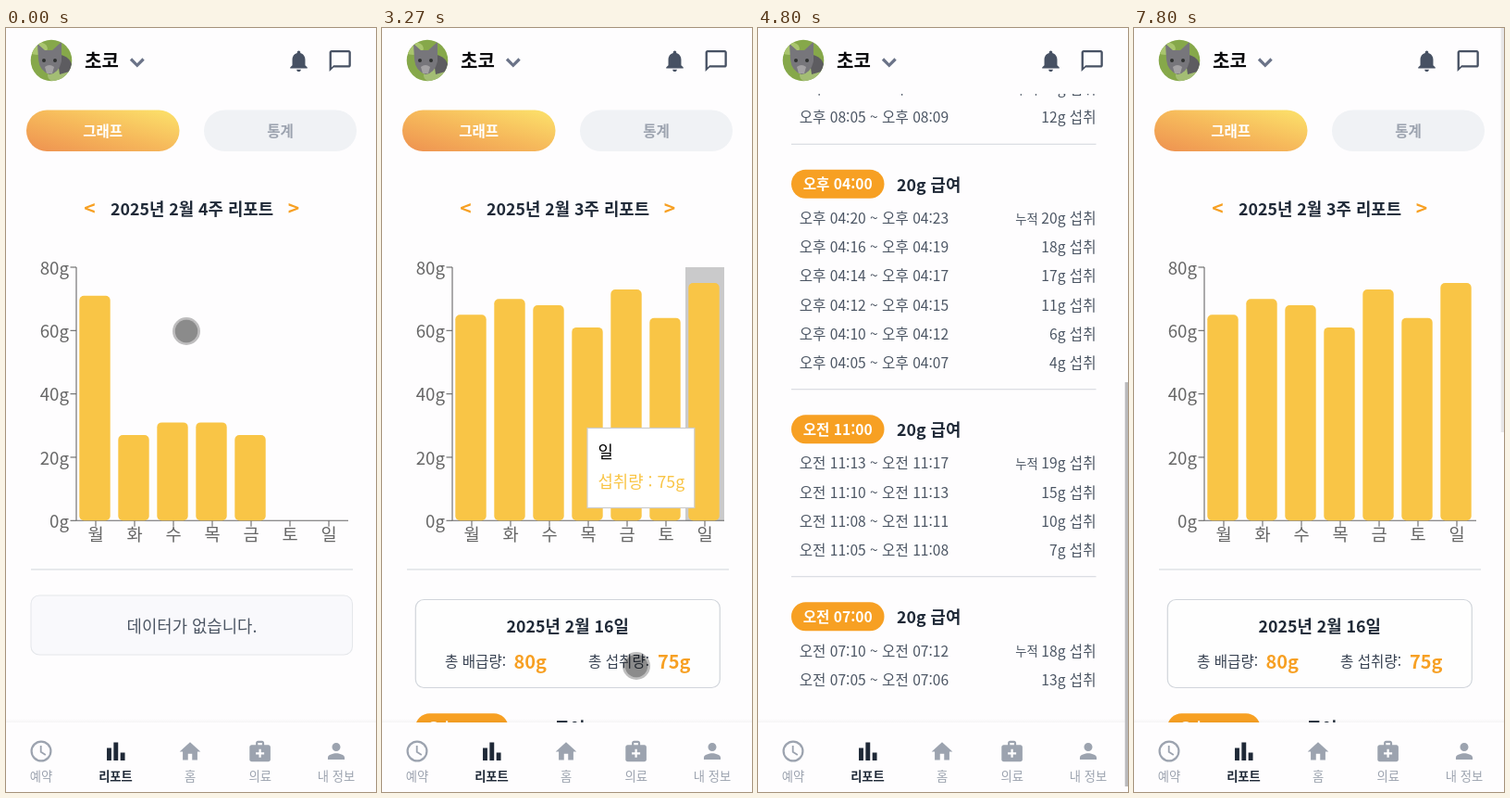
An HTML page that plays this animation: 400 px wide and 824 px high, repeating every 8540 ms.

```html
<!DOCTYPE html>
<html lang="ko">
<head>
<meta charset="utf-8">
<title>리포트</title>
<style>
html, body { margin: 0; width: 100%; height: 100%; overflow: hidden; background: #fefdfe; }
svg { display: block; width: 100%; height: 100%; font-family: "Noto Sans CJK KR", "Noto Sans KR", "Noto Sans CJK", sans-serif; }
</style>
</head>
<body>
<svg id="stage" viewBox="0 0 400 824">
  <defs>
    <linearGradient id="warm" x1="0" y1="1" x2="1" y2="0">
      <stop offset="0" stop-color="#ee9150"/>
      <stop offset=".5" stop-color="#f6b95b"/>
      <stop offset="1" stop-color="#fce36b"/>
    </linearGradient>
    <linearGradient id="shade" x1="0" y1="0" x2="0" y2="1">
      <stop offset="0" stop-color="#000" stop-opacity="0"/>
      <stop offset="1" stop-color="#000" stop-opacity=".035"/>
    </linearGradient>
    <clipPath id="round"><circle cx="49" cy="35" r="22.3"/></clipPath>
  </defs>
</svg>
<script>
(() => {
const LOOP = 8540;
const INK = '#1f2937', BODY = '#4b5563', MUTED = '#9ca3af', LINE = '#d1d5db';
const ORANGE = '#f7a023', YELLOW = '#f9c546', AXIS = '#666', PAPER = '#fefdfe';
const SMALL = 13.3, MID = 15.6, BASE = 17.8, BIG = 20;

const stage = document.getElementById('stage');

function add(parent, tag, attrs = {}) {
  const el = document.createElementNS('http://www.w3.org/2000/svg', tag);
  for (const k in attrs) el.setAttribute(k, attrs[k]);
  parent.appendChild(el);
  return el;
}
const group = parent => add(parent, 'g');
const rect = (parent, x, y, width, height, fill, more) =>
  add(parent, 'rect', { x, y, width, height, fill, ...more });
const line = (parent, x1, y1, x2, y2, stroke, width = 1.1) =>
  add(parent, 'line', { x1, y1, x2, y2, stroke, 'stroke-width': width });
// cy is the visual middle of the line of text
function text(parent, str, x, cy, size, fill, weight = 400, anchor = 'start') {
  const el = add(parent, 'text', {
    x, y: cy + size * 0.37, fill, 'font-size': size, 'font-weight': weight, 'text-anchor': anchor
  });
  el.textContent = str;
  return el;
}
const icon = (parent, d, cx, cy, scale, fill) => add(parent, 'path', {
  d, fill, transform: `translate(${cx} ${cy}) scale(${scale}) translate(-12 -12)`
});
const show = (el, on) => el.setAttribute('visibility', on ? 'visible' : 'hidden');

// Scrolling page
const page = group(stage);
rect(page, 22, 88.5, 165.5, 44.5, 'url(#warm)', { rx: 22.2 });
text(page, '그래프', 104.7, 111, MID, '#fff', 700, 'middle');
rect(page, 214, 88.5, 165, 44.5, '#f0f2f5', { rx: 22.2 });
text(page, '통계', 296.5, 111, MID, MUTED, 700, 'middle');
text(page, '<', 90.5, 194.5, 21, ORANGE, 700, 'middle');
text(page, '>', 311, 194.5, 21, ORANGE, 700, 'middle');
const title = text(page, '', 201, 195, BASE, INK, 600, 'middle');

// Chart
const LEFT = 76, RIGHT = 370, TOP = 258, FLOOR = 531.3, STEP = 42;
const UNIT = (FLOOR - TOP) / 80;
const WEEKS = [[71, 27, 31, 31, 27, 0, 0], [65, 70, 68, 61, 73, 64, 75]];
const band = rect(page, RIGHT - STEP, TOP, STEP, FLOOR - TOP, '#cacacb');
line(page, LEFT, TOP, LEFT, FLOOR, AXIS);
line(page, LEFT, FLOOR, RIGHT, FLOOR, AXIS);
for (let g = 0; g <= 80; g += 20) {
  const y = FLOOR - g * UNIT;
  line(page, LEFT - 6.5, y, LEFT, y, AXIS);
  text(page, g + 'g', 68, y + 0.7, 18.7, AXIS, 400, 'end');
}
const bars = [...'월화수목금토일'].map((day, i) => {
  const mid = LEFT + STEP * (i + 0.5);
  line(page, mid, FLOOR, mid, FLOOR + 6.5, AXIS);
  text(page, day, mid, 546.5, 18.7, AXIS, 400, 'middle');
  return rect(page, LEFT + STEP * i + 3.3, FLOOR, 33.4, 0, YELLOW, { rx: 5 });
});
line(page, 27, 584, 375, 584, LINE);

const tip = group(page);
rect(tip, 222, 431.5, 115.8, 86, '#fff', { stroke: '#ccc', 'stroke-width': 1.2 });
text(tip, '일', 233.5, 457.5, BASE, '#000');
text(tip, '섭취량 : 75g', 233.5, 489, BASE, YELLOW);

const empty = group(page);
rect(empty, 27, 612, 347.5, 64, '#f9f9fc', { rx: 9, stroke: '#e5e7eb', 'stroke-width': 1.1 });
text(empty, '데이터가 없습니다.', 201, 645, BASE, BODY, 400, 'middle');

// Daily details
const detail = group(page);
rect(detail, 36.3, 616.5, 329, 95, '#fefefe', { rx: 9, stroke: LINE, 'stroke-width': 1.2 });
text(detail, '2025년 2월 16일', 200.7, 645, BASE, INK, 600, 'middle');
text(detail, '총 배급량:', 68, 683, MID, '#374151', 500);
text(detail, '80g', 142.5, 683.5, BIG, ORANGE, 700);
text(detail, '총 섭취량:', 223, 683, MID, '#374151', 500);
text(detail, '75g', 298, 683.5, BIG, ORANGE, 700);

const MEALS = [
  ['오후', '08:00', '08:07-08:10 18', '08:05-08:09 12'],
  ['오후', '04:00', '04:20-04:23 20', '04:16-04:19 18', '04:14-04:17 17',
    '04:12-04:15 11', '04:10-04:12 6', '04:05-04:07 4'],
  ['오전', '11:00', '11:13-11:17 19', '11:10-11:13 15', '11:08-11:11 10', '11:05-11:08 7'],
  ['오전', '07:00', '07:10-07:12 18', '07:05-07:06 13']
];
let mealTop = 739.3;
MEALS.forEach(([half, hour, ...rows], m) => {
  rect(detail, 36, mealTop, 100.5, 31, ORANGE, { rx: 15.5 });
  text(detail, `${half} ${hour}`, 86.2, mealTop + 16, MID, '#fff', 700, 'middle');
  text(detail, '20g 급여', 150, mealTop + 16.5, BASE, INK, 600);
  let y = mealTop + 52.5;
  rows.forEach((row, i) => {
    const [from, to, grams] = row.split(/[- ]/);
    text(detail, `${half} ${from} ~ ${half} ${to}`, 44.7, y, MID, BODY);
    text(detail, `${grams}g 섭취`, 365.5, y, MID, BODY, 400, 'end');
    if (!i) text(detail, '누적', 302.7, y + 0.5, SMALL, BODY, 400, 'end');
    y += 31.2;
  });
  const end = y - 2.7;
  if (m < MEALS.length - 1) line(detail, 36, end, 365.5, end, LINE);
  mealTop = end + 27.5;
});

// Header
const head = group(stage);
rect(head, 0, 0, 400, 71, PAPER);
const photo = add(head, 'g', { 'clip-path': 'url(#round)' });
rect(photo, 26, 12, 46, 46, '#86a84a');
add(photo, 'ellipse', { cx: 34, cy: 22, rx: 11, ry: 7, fill: '#a9c56e' });
add(photo, 'ellipse', { cx: 60, cy: 51, rx: 15, ry: 9, fill: '#a3bd74' });
add(photo, 'path', { d: 'M55 28Q72 30 72 46L58 50Z', fill: '#5d5c60' });
add(photo, 'path', { d: 'M34 17L42 24H50L60 15L60 36Q57 49 47 50Q36 46 35 34Z', fill: '#77767b' });
add(photo, 'path', { d: 'M42 42Q47 38 52 42L50 49H44Z', fill: '#a3a1a3' });
for (const cx of [41, 53]) add(photo, 'circle', { cx, cy: 35, r: 2, fill: '#2f3130' });
text(head, '초코', 85, 36, BIG, '#0b0b0d', 700);
add(head, 'path', { d: 'M135 33.5L141.8 40.3L148.6 33.5', fill: 'none', stroke: '#6b7388', 'stroke-width': 3.2 });
icon(head, 'M12 22c1.1 0 2-.9 2-2h-4c0 1.1.89 2 2 2zm6-6v-5c0-3.07-1.64-5.64-4.5-6.32V4c0-.83-.67-1.5-1.5-1.5s-1.5.67-1.5 1.5v.68C7.63 5.36 6 7.92 6 11v5l-2 2v1h16v-1l-2-2z', 316.5, 35.5, 1.16, '#475163');
icon(head, 'M20 2H4c-1.1 0-2 .9-2 2v18l4-4h14c1.1 0 2-.9 2-2V4c0-1.1-.9-2-2-2zm0 14H6l-2 2V4h16v12z', 361.2, 35.5, 1.16, '#475163');

// Bottom navigation
const nav = group(stage);
rect(nav, 0, 745, 400, 4, 'url(#shade)');
rect(nav, 0, 749, 400, 75, PAPER);
add(nav, 'circle', { cx: 38, cy: 780, r: 10.4, fill: 'none', stroke: MUTED, 'stroke-width': 2.2 });
add(nav, 'path', { d: 'M37.7 774V780.8L42.8 784', fill: 'none', stroke: MUTED, 'stroke-width': 1.8 });
icon(nav, 'M4 9h4v11H4zm12 4h4v7h-4zm-6-9h4v16h-4z', 118.8, 780.2, 1.22, INK);
icon(nav, 'M10 20v-6h4v6h5v-8h3L12 3 2 12h3v8z', 199, 780.5, 1.13, MUTED);
icon(nav, 'M20 6h-4V4c0-1.1-.9-2-2-2h-4c-1.1 0-2 .9-2 2v2H4c-1.1 0-2 .9-2 2v12c0 1.1.9 2 2 2h16c1.1 0 2-.9 2-2V8c0-1.1-.9-2-2-2zM10 4h4v2h-4V4zm6 11h-3v3h-2v-3H8v-2h3v-3h2v3h3v2z', 274.6, 780, 1.13, MUTED);
icon(nav, 'M12 12c2.21 0 4-1.79 4-4s-1.79-4-4-4-4 1.79-4 4 1.79 4 4 4zm0 2c-2.67 0-8 1.34-8 4v2h16v-2c0-2.66-5.33-4-8-4z', 357, 780, 1.13, MUTED);
[['예약', 38], ['리포트', 118.5], ['홈', 199], ['의료', 274.7], ['내 정보', 357]].forEach(([label, x], i) =>
  text(nav, label, x, 807, SMALL, i === 1 ? INK : MUTED, i === 1 ? 700 : 400, 'middle'));

// Overlays
const thumb = rect(stage, 396.7, 0, 3.3, 436, '#bababc');
const dot = group(stage);
add(dot, 'circle', { r: 13.7, fill: 'none', stroke: '#000', 'stroke-opacity': 0.25, 'stroke-width': 2.6 });
add(dot, 'circle', { r: 12.4, fill: '#000', 'fill-opacity': 0.45 });

// Motion
const END = 726.3;
const clamp = v => Math.min(1, Math.max(0, v));
const span = (t, a, b) => clamp((t - a) / (b - a));
const drag = p => Math.pow(p, 1.2);
const coast = p => 1 - Math.pow(1 - p, 3);
const smooth = p => p * p * (3 - 2 * p);

function scrollAt(t) {
  if (t < 4270) return 636 * drag(span(t, 3330, 4270));
  if (t < 5350) return 636 + (END - 636) * coast(span(t, 4270, 4603));
  const held = END - 549 * drag(span(t, 5350, 6450));
  return held * (1 - coast(span(t, 6450, 7335)));
}

function touchAt(t, s) {
  if (t < 135) return [195, 327];
  if (t >= 600 && t < 800) return [90, 194];
  if (t >= 2000 && t < 2470) return [350, 420];
  if (t >= 3200 && t < 4270) return [275 + 7 * s / 580, 688 - 594 * s / 580];
  if (t >= 5250 && t < 6450) {
    const moved = (END - s) / 519.3;
    return [284 + 4 * moved, 257 + 533 * moved];
  }
  return null;
}

function thumbAlpha(t) {
  if (t < 3330) return 0;
  return t < 5350 ? 1 - span(t, 4900, 5150) : 1 - span(Math.min(t, 7800), 7635, 7885);
}

function draw(t) {
  const s = scrollAt(t);
  page.setAttribute('transform', `translate(0 ${-s})`);
  title.textContent = `2025년 2월 ${t < 1200 ? 4 : 3}주 리포트`;

  const grow = smooth(span(t, 1200, 1600));
  bars.forEach((bar, i) => {
    const h = UNIT * (WEEKS[0][i] + (WEEKS[1][i] - WEEKS[0][i]) * grow);
    bar.setAttribute('y', FLOOR - h);
    bar.setAttribute('height', h);
  });

  const picked = t >= 2530 && t < 7000;
  show(band, picked);
  show(tip, picked);
  show(empty, t < 2670);
  show(detail, t >= 2670);

  thumb.setAttribute('y', s * 0.526);
  thumb.setAttribute('opacity', thumbAlpha(t));
  const touch = touchAt(t, s);
  show(dot, touch);
  if (touch) dot.setAttribute('transform', `translate(${touch})`);
}

const start = performance.now();
function tick() {
  draw((performance.now() - start) % LOOP);
  requestAnimationFrame(tick);
}
tick();
})();
</script>
</body>
</html>
```
